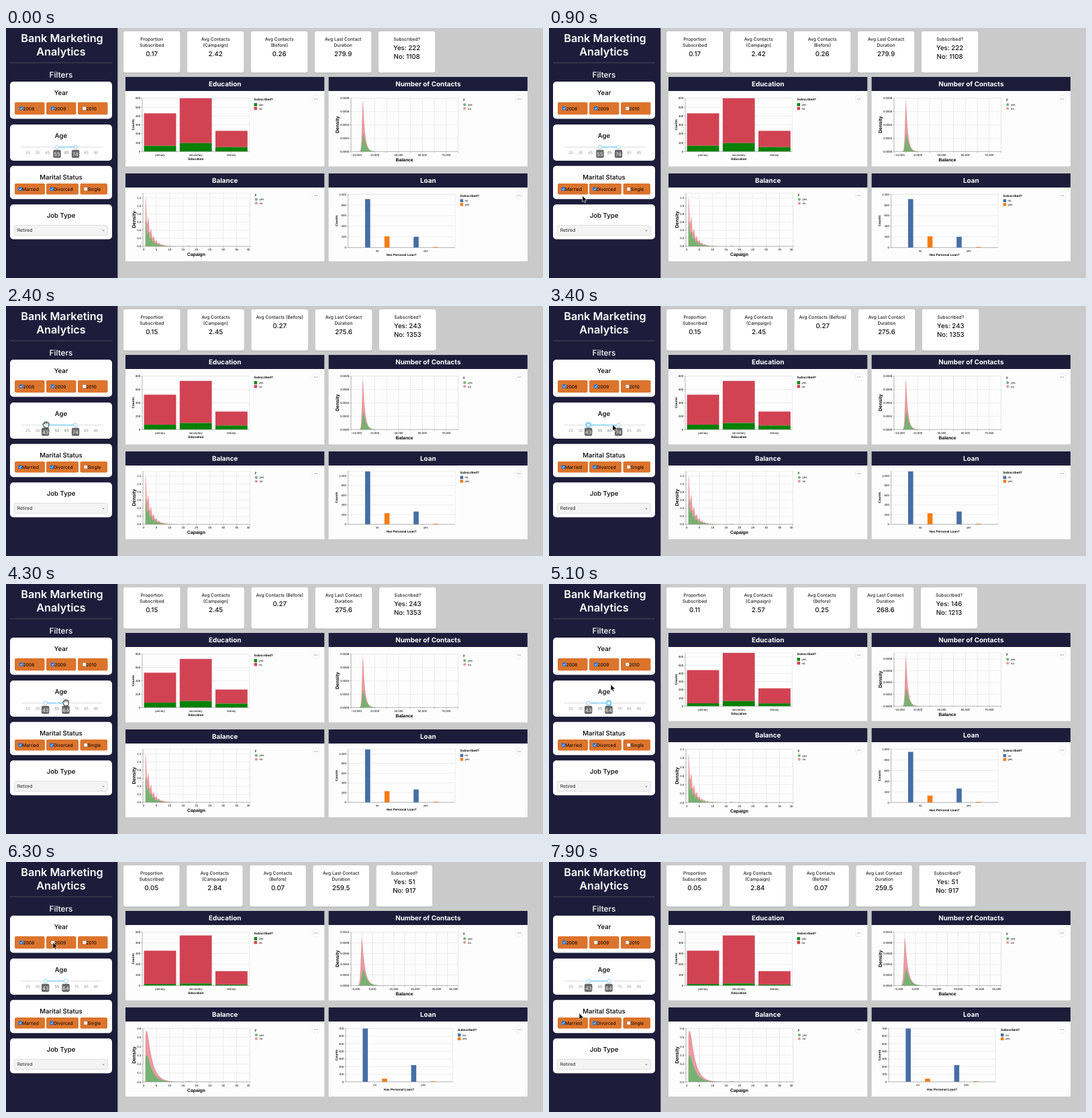
An HTML page for the animation above (8 s loop, 800 by 373 pixels).

```html
<!DOCTYPE html>
<html lang="en">
<head>
<meta charset="utf-8">
<title>Bank Marketing Analytics</title>
<style>
html, body { margin: 0; width: 100%; height: 100%; overflow: hidden; background: #cacaca; }
svg { display: block; width: 800px; height: 373px; }
text { font-family: Inter, "Open Sans", sans-serif; text-rendering: geometricPrecision; }
.chart text { font-family: "Liberation Sans", Arial, sans-serif; }
</style>
</head>
<body>
<svg id="stage" viewBox="0 0 800 373"></svg>
<script>
const NAVY = '#1d1c3a', ORANGE = '#dc742c';
const RED = '#d14353', GREEN = '#068006', PINK = '#e8959b', LEAF = '#70b470';
const BLUE = '#466ea5', AMBER = '#f67d12';
const PLOT_W = 159.5, PLOT_H = 79.5;

// --- drawing helpers -------------------------------------------------
const rect = (x, y, w, h, fill, extra = '') =>
  `<rect x="${x}" y="${y}" width="${w}" height="${h}" fill="${fill}" ${extra}/>`;
const line = (x1, y1, x2, y2, stroke = '#ddd') =>
  `<path d="M${x1} ${y1}L${x2} ${y2}" stroke="${stroke}" stroke-width=".5"/>`;
const circle = (x, y, r, fill, extra = '') =>
  `<circle cx="${x}" cy="${y}" r="${r}" fill="${fill}" ${extra}/>`;
const text = (s, x, y, size, { anchor = 'middle', fill = '#000', weight = 400, turn = 0 } = {}) =>
  `<text x="${x}" y="${y}" font-size="${size}" text-anchor="${anchor}" fill="${fill}" ` +
  `font-weight="${weight}"${turn ? ` transform="rotate(${turn} ${x} ${y})"` : ''}>${s}</text>`;
const title = (s, x, y, size, turn = 0) => text(s, x, y, size, { weight: 700, turn });
const tick = (s, x, y, anchor = 'middle') => text(s, x, y, 4.35, { anchor });
const range = (n, f) => Array.from({ length: n }, (_, i) => f(i)).join('');
const number = v => (v < 0 ? '−' : '') + Math.abs(v).toLocaleString('en-US');

// --- chart parts -----------------------------------------------------
const niceStep = max => (max > 700 ? 200 : 100);

// Area under a height function, from x0 to the end of the plot.
const area = (f, x0, x1, base, fill) =>
  `<path d="M${x0} ${base}` + range(Math.floor((x1 - x0) * 2), i => {
    const x = x0 + i / 2;
    return `L${x} ${(base - f(x)).toFixed(2)}`;
  }) + `V${base}Z" fill="${fill}" opacity=".95"/>`;

// Bell on the left of the peak, decay on the right.
const skewed = (height, peak, left, right) => x => height *
  (x < peak ? Math.exp(-(((x - peak) / left) ** 2) / 2) : Math.exp(-(((x - peak) / right) ** 1.05)));

// Kernel density over whole contact counts, each rarer than the one before.
const contactDensity = (height, width) => x => {
  let sum = 0;
  for (let k = 1; k <= 20; k++) {
    const share = 0.6 ** (k - 1) + (k === 17 ? 0.015 : 0);
    sum += share * Math.exp(-(((x - 204 - 4 * k) / width) ** 2) / 2);
  }
  return height * sum;
};

function yAxis(x0, base, max, step, format) {
  let out = `<rect x="${x0}" y="${base - PLOT_H}" width="${PLOT_W}" height="${PLOT_H}" fill="none" stroke="#ddd" stroke-width=".5"/>`;
  for (let i = 0; i * step <= max * 1.001; i++) {
    const y = base - i * step / max * PLOT_H;
    out += line(x0, y, x0 + PLOT_W, y) + line(x0 - 2, y, x0, y, '#888') +
      tick(format(i * step), x0 - 2.8, y + 1.5, 'end');
  }
  return out;
}

// Grid with n steps; end labels are kept inside the plot.
const xAxis = (x0, base, n, every, label) => range(n + 1, i => {
  const x = x0 + i * PLOT_W / n;
  const side = i === 0 ? 'start' : i === n ? 'end' : 'middle';
  return line(x, base - PLOT_H, x, base) + line(x, base, x, base + 2, '#888') +
    (i % every ? '' : tick(label(i), x, base + 6.5, side));
});

const frame = (x0, base) =>
  line(x0, base - PLOT_H, x0, base, '#888') + line(x0, base, x0 + PLOT_W, base, '#888');

const legend = (head, x, base, items, round) =>
  text(head, x, base - 76, 4.7, { anchor: 'start', weight: 700 }) + items.map(([name, color], i) => {
    const y = base - 70 + i * 5.7;
    const mark = round ? circle(x + 2.2, y, 2.1, color) : rect(x, y - 2.2, 4.5, 4.5, color);
    return mark + tick(name, x + 7, y + 1.5, 'start');
  }).join('');

// --- data ------------------------------------------------------------
const first = {
  at: 0, pitch: 95, campaign: '2.42', before: '0.26', duration: '279.9', yes: 222, no: 1108,
  eduMax: 600, edu: [[430, 65], [600, 95], [233, 50]], densMax: 0.0008,
  all: [76, 531.8, 1.4, 3.2], sub: [27, 532.6, 1.8, 4],
  campMax: 1.32, camp: [72, 1.3], campBase: 325.8,
  loanMax: 1000, loan: [910, 212, 202, 11], loanBase: 327.6
};
const second = {
  ...first, at: 2300, pitch: 95.25, campaign: '2.45', before: '0.27', duration: '275.6', yes: 243, no: 1353,
  oneLine: true, eduMax: 800, edu: [[523, 73], [730, 98], [270, 60]],
  loanMax: 1097, loan: [1090, 230, 265, 13], loanBase: 325.8
};
const third = {
  ...first, at: 4500, pitch: 94.75, campaign: '2.57', before: '0.25', duration: '268.6', yes: 146, no: 1213,
  rise: 2, eduMax: 650, edu: [[440, 35], [650, 62], [218, 34]], densMax: 0.0009,
  campMax: 1.2, campBase: 326, loan: [950, 130, 262, 12], loanBase: 326
};
const fourth = {
  ...first, at: 6100, pitch: 94.15, campaign: '2.84', before: '0.07', duration: '259.5', yes: 51, no: 917,
  late: true, eduMax: 500, edu: [[327, 14], [470, 19], [135, 9]], densMax: 0.001,
  all: [72, 530.4, 1.7, 4.6], sub: [25, 532.5, 2.4, 5.5],
  campMax: 0.6, camp: [57, 3], campBase: 328,
  loanMax: 700, loan: [700, 42, 220, 8], loanBase: 328
};
const states = [first, second, third, fourth];

// --- main area -------------------------------------------------------
function statCards(s) {
  const share = (s.yes / (s.yes + s.no)).toFixed(2), w = s.pitch - 10.7;
  const cards = [
    [['Proportion', 'Subscribed'], share],
    [['Avg Contacts', '(Campaign)'], s.campaign],
    [s.oneLine ? ['Avg Contacts (Before)'] : ['Avg Contacts', '(Before)'], s.before],
    [['Avg Last Contact', 'Duration'], s.duration],
    [['Subscribed?'], 'Yes: ' + s.yes, 'No: ' + s.no]
  ];
  return cards.map(([rows, ...values], i) => {
    const x = 175 + i * s.pitch, c = x + w / 2;
    return rect(x, 5.8, w, 62, '#000', 'rx="3" opacity=".12"') + rect(x, 5, w, 61.6, '#fff', 'rx="3"') +
      rows.map((r, k) => text(r, c, 19.2 + k * 8.3, 6.7, { weight: 500, fill: '#222' })).join('') +
      values.map((v, k) => text(v, c, 25.1 + rows.length * 8.3 + k * 12.3, 9.7, { weight: 500, fill: '#111' })).join('');
  }).join('');
}

function panel(name, x, y, bottom) {
  const mx = x + 283.6, my = y + 33;
  return rect(x, y, 296.3, bottom - y, '#fdfdfd') + rect(x, y, 296.3, 21, NAVY) +
    text(name, x + 148.2, y + 14.1, 9.9, { weight: 700, fill: '#fff' }) +
    circle(mx, my, 5.6, '#fff', 'stroke="#e6e6e6" stroke-width=".7"') +
    [-2.1, 0, 2.1].map(d => circle(mx + d, my, 0.65, '#888')).join('');
}

function educationChart(s, base) {
  const x0 = 203, k = PLOT_H / s.eduMax;
  const bars = ['primary', 'secondary', 'tertiary'].map((name, i) => {
    const x = x0 + 2.6 + i * 53.2, [all, yes] = s.edu[i];
    return rect(x, base - all * k, 47.8, (all - yes) * k, RED) + rect(x, base - yes * k, 47.8, yes * k, GREEN) +
      line(x + 23.9, base, x + 23.9, base + 2, '#888') + tick(name, x + 23.9, base + 6.5);
  }).join('');
  return yAxis(x0, base, s.eduMax, niceStep(s.eduMax), number) + bars + frame(x0, base) +
    title('Counts', 191, base - 40, 4.75, -90) + title('Education', 283, base + 12.8, 4.75) +
    legend('Subscribed?', 369.6, base, [['yes', GREEN], ['no', RED]]);
}

function contactsChart(s, base) {
  const x0 = 514, x1 = x0 + PLOT_W;
  const [low, step, n] = s.late ? [-5000, 5000, 10] : [-10000, 10000, 9];
  return yAxis(x0, base, s.densMax, 0.0002, v => v.toFixed(4)) +
    xAxis(x0, base, n, 2, i => number(low + i * step)) +
    area(skewed(...s.all), 524, x1, base, PINK) + area(skewed(...s.sub), 524, x1, base, LEAF) + frame(x0, base) +
    title('Density', 495.6, base - 40, 7.1, -90) + title('Balance', 593.6, base + 14.5, 6.8) +
    legend('y', 681, base, [['yes', LEAF], ['no', PINK]], true);
}

function campaignChart(s, base) {
  const x0 = 204, x1 = x0 + PLOT_W, [height, width] = s.camp;
  return yAxis(x0, base, s.campMax, s.campMax > 1 ? 0.2 : 0.1, v => v.toFixed(1)) +
    xAxis(x0, base, 8, 1, i => i * 5) +
    area(contactDensity(height, width), 207.7, x1, base, PINK) +
    area(contactDensity(height * 0.52, width), 207.7, x1, base, LEAF) + frame(x0, base) +
    title('Density', 193, base - 40, 7.1, -90) + title('Capaign', 283.5, base + 14.5, 6.8) +
    legend('y', 370.6, base, [['yes', LEAF], ['no', PINK]], true);
}

function loanChart(s, base) {
  const x0 = s.late ? 506 : 509.6, k = PLOT_H / s.loanMax;
  const bars = s.loan.map((v, i) =>
    rect(x0 + 25.4 + (i >> 1) * 72.2 + (i & 1) * 28.8, base - v * k, 7.6, v * k, i & 1 ? AMBER : BLUE)).join('');
  return yAxis(x0, base, s.loanMax, niceStep(s.loanMax - 1), number) + bars + frame(x0, base) +
    ['no', 'yes'].map((v, i) => tick(v, x0 + 43.5 + i * 72.2, base + 6.4)).join('') +
    title('Counts', 494, base - 40, 4.75, -90) + title('Has Personal Loan?', x0 + 79.6, base + 12.6, 4.7) +
    legend('Subscribed?', x0 + 167, base, [['no', BLUE], ['yes', AMBER]]);
}

function board(s) {
  const up = s.rise || 0, row2 = 217 - up, end = s.late ? 350 : 348, base = 184.3 - up;
  return statCards(s) +
    panel('Education', 178, 73, 206.5 - up) + panel('Number of Contacts', 480.6, 73, 206.5 - up) +
    panel('Balance', 178, row2, end) + panel('Loan', 480.6, row2, end) +
    `<g class="chart">${educationChart(s, base)}${contactsChart(s, base)}` +
    `${campaignChart(s, s.campBase)}${loanChart(s, s.loanBase)}</g>`;
}

// --- sidebar ---------------------------------------------------------
const checkbox = (x, y, on) => on
  ? rect(x, y, 5.4, 5.4, '#1a73e8', 'rx=".8"') +
    `<path d="M${x + 1.1} ${y + 2.8}l1.2 1.2l2-2.6" fill="none" stroke="#fff" stroke-width=".9"/>`
  : rect(x + 0.2, y + 0.2, 5, 5, '#fff', 'rx=".8" stroke="#777" stroke-width=".4"');

const option = (name, x, y, w, h, inset, on) =>
  rect(x, y, w, h, ORANGE, 'rx="2"') + checkbox(x + inset, y + h / 2 - 2.7, on) +
  text(name, x + inset + 5.4, y + h / 2 + 2.5, 6.8, { anchor: 'start' });

const yearOption = (i, on) => option(2008 + i, 13 + i * 47, 110.7, 44.5, 18.6, 7, on);

function sidebar() {
  const white = { fill: '#fff', weight: 600 };
  const cards = [['Year', 80, 55.5], ['Age', 144, 54], ['Marital Status', 205.8, 49.5], ['Job Type', 263.3, 52]];
  return rect(0, 0, 166.3, 373, NAVY) +
    text('Bank Marketing', 83.5, 21.2, 16.2, white) + text('Analytics', 82, 41.2, 16.2, white) +
    rect(6, 51, 152, 1.6, '#3a3950') + text('Filters', 82, 74, 11.8, { fill: '#fff', weight: 500 }) +
    cards.map(([name, y, h]) =>
      rect(6, y, 152, h, '#fff', 'rx="5"') + text(name, 82, y + 20, 9.6, { weight: 500 })).join('') +
    yearOption(0, true) + yearOption(2, false) +
    option('Married', 13, 232, 45, 16.5, 5.5, true) + option('Divorced', 60, 232, 48, 16.5, 5.5, true) +
    option('Single', 110.5, 232, 40.5, 16.5, 5.5, false) +
    rect(12.3, 294.3, 139, 15, '#f4f4f4', 'rx="2" stroke="#ccc" stroke-width=".6"') +
    text('Retired', 16.8, 304.2, 6.8, { anchor: 'start', fill: '#222' }) +
    '<path d="M143 301.4h4l-2 2z" fill="#999"/>';
}

const ageX = age => 32.5 + (age - 25) * 1.45;

function slider(low, high, focus) {
  const a = ageX(low), b = ageX(high), y = 177.6;
  const dots = range(8, i => {
    const age = 25 + i * 10, on = age >= low && age <= high;
    return circle(ageX(age), y, 1.2, '#fff', `stroke="${on ? '#96dbfa' : '#e2e2e2'}" stroke-width=".8"`) +
      text(age, ageX(age), 188.2, 5.8, { fill: on ? '#777' : '#999' });
  });
  const handles = [low, high].map((age, i) => {
    const x = ageX(age), lit = focus === i;
    return (lit ? circle(x, y, 4.8, '#96dbfa') : '') +
      circle(x, y, 2.6, '#fff', `stroke="${lit ? '#57c5f7' : '#8fd3f7'}"`) +
      rect(x - 5.7, 181.8, 11.4, 12, '#686868', 'rx="2"') + text(age, x, 190.6, 7.4, { fill: '#fff' });
  }).join('');
  return rect(22, y - 0.9, 122, 1.8, '#e9e9e9', 'rx=".9"') + rect(a, y - 0.9, b - a, 1.8, '#8fd6fa') + dots + handles;
}

// --- motion ----------------------------------------------------------
const ARROW = '<path d="M0 0V9.3L2.1 7.4L3.5 10.6L5 10L3.6 6.8H6.7Z" stroke="#fff" stroke-width=".6"/>';
const HAND = '<path d="M-4.2 .4C-5-1.4-3.2-2.2-2.4-.8V-3.2C-2.3-4.7-.8-4.6-.7-3.2C-.6-5 1-4.8 1-3.2C1.2-4.6 2.6-4.3 2.6-2.8C3-3.8 4.3-3.3 4.3-2C4.4 1 3.7 3 3 4.8H-2C-2.5 3-3.4 1.8-4.2 .4Z" fill="#fff" stroke="#000" stroke-width=".8"/>' +
  '<path d="M-.7-3V-.6M1-3V-.6M2.6-2.6V-.4" stroke="#000" stroke-width=".5"/>';

const ease = k => k * k * (3 - 2 * k);
const ramp = (t, t0, t1, a, b) => a + (b - a) * ease(Math.max(0, Math.min(1, (t - t0) / (t1 - t0))));
const between = (t, a, b) => t >= a && t < b;

// Each move: start, end, then the place reached.
const moves = [
  [700, 1400, 57, 178], [1500, 1700, ageX(55), 177], [1800, 2100, ageX(43) + 1, 177],
  [2900, 3600, ageX(74), 177], [3800, 4200, ageX(64), 177], [4800, 5100, 92, 150],
  [5200, 5700, 70, 120], [6600, 7400, 45, 225.5]
];

function cursor(t) {
  if (t < 500) return '';
  let x = 48, y = 268;
  for (const [t0, t1, toX, toY] of moves) {
    x = ramp(t, t0, t1, x, toX);
    y = ramp(t, t0, t1, y, toY);
  }
  const onHandle = between(t, 1700, 3000) || between(t, 3500, 4900);
  return `<g transform="translate(${x} ${y})">${onHandle ? HAND : ARROW}</g>`;
}

const stage = document.getElementById('stage');
stage.innerHTML = rect(0, 0, 800, 373, '#cacaca') + sidebar() +
  states.map(s => `<g class="board">${board(s)}</g>`).join('') + '<g id="live"></g>';
const boards = [...document.querySelectorAll('.board')];
const live = document.getElementById('live');
const start = performance.now();
let shown = -1;

function draw() {
  const t = Math.floor((performance.now() - start) % 8000 / 100) * 100;
  if (t !== shown) {
    shown = t;
    const current = states.filter(s => s.at <= t).length - 1;
    boards.forEach((g, i) => { g.style.display = i === current ? '' : 'none'; });
    const low = Math.round(ramp(t, 1800, 2100, 55, 43));
    const high = Math.round(ramp(t, 3800, 4200, 74, 64));
    const focus = between(t, 1800, 3700) ? 0 : between(t, 3700, 5800) ? 1 : -1;
    live.innerHTML = slider(low, high, focus) + yearOption(1, t < 5800) + cursor(t);
  }
  requestAnimationFrame(draw);
}
draw();
</script>
</body>
</html>
```
